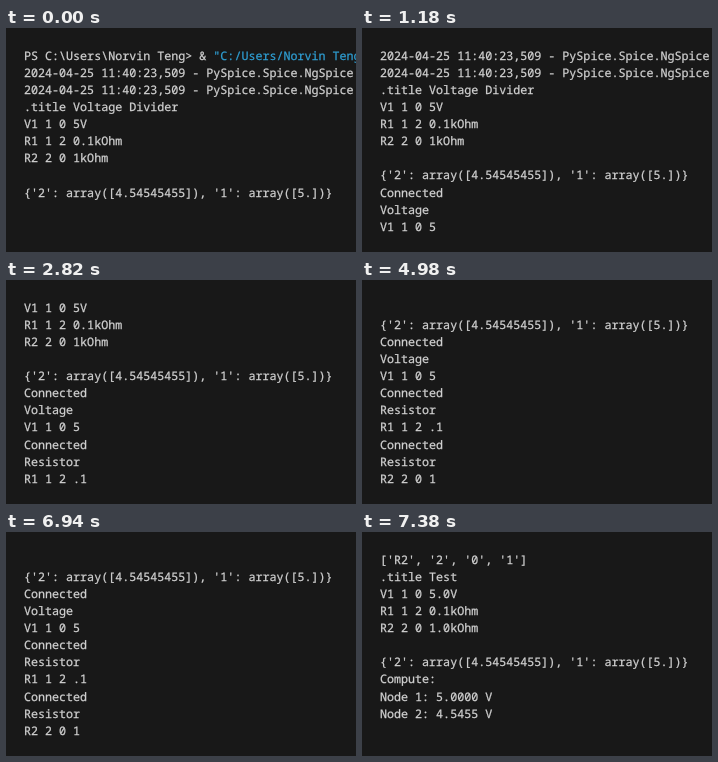
An HTML page for the animation above (8000 ms loop, 350 by 224 pixels).

```html
<!DOCTYPE html>
<html lang="en">
<head>
<meta charset="utf-8">
<title>Circuit terminal</title>
<style>
  html, body {
    margin: 0;
    width: 100%;
    height: 100%;
    overflow: hidden;
    background: #181818;
  }
  #stage {
    position: relative;
    width: 350px;
    height: 224px;
    overflow: hidden;
    background: #181818;
  }
  #term {
    position: absolute;
    left: 18px;
    top: 19.8px;
    margin: 0;
    color: #d2d2d2;
    font: 11.7px/17.1px "Noto Sans Mono", "DejaVu Sans Mono", monospace;
    font-variant-ligatures: none;
    text-rendering: geometricPrecision;
    -webkit-text-stroke: 0.25px;
    white-space: pre;
  }
  .path { color: #2f9fd4; }
</style>
</head>
<body>
<div id="stage"><pre id="term"></pre></div>
<script>
const LOOP = 8000;
const ROWS = 11;
const log = '2024-04-25 11:40:23,509 - PySpice.Spice.NgSpice.';
const result = "{'2': array([4.54545455]), '1': array([5.])}";

const lines = [
  'PS C:\\Users\\Norvin Teng> &amp; <span class="path">"C:/Users/Norvin Teng/</span>',
  log,
  log,
  '.title Voltage Divider',
  'V1 1 0 5V',
  'R1 1 2 0.1kOhm',
  'R2 2 0 1kOhm',
  '',
  result,
  'Connected', 'Voltage', 'V1 1 0 5',
  'Connected', 'Resistor', 'R1 1 2 .1',
  'Connected', 'Resistor', 'R2 2 0 1',
  "['R2', '2', '0', '1']",
  '.title Test',
  'V1 1 0 5.0V',
  'R1 1 2 0.1kOhm',
  'R2 2 0 1.0kOhm',
  '',
  result,
  'Compute:',
  'Node 1: 5.0000 V',
  'Node 2: 4.5455 V',
  ''
];

// [time in ms, number of lines printed so far]
const steps = [
  [0, 9],
  [500, 10], [540, 11], [580, 12],
  [2740, 13], [2780, 14], [2820, 15],
  [4980, 18],
  [7140, 29]
];

const term = document.getElementById('term');
const start = performance.now();
let shown = 0;

function draw(now) {
  const t = Math.max(0, now - start) % LOOP;
  const count = steps.filter(([at]) => at <= t).pop()[1];
  if (count !== shown) {
    shown = count;
    term.innerHTML = lines.slice(Math.max(0, count - ROWS), count).join('\n');
  }
  requestAnimationFrame(draw);
}
draw(start);
</script>
</body>
</html>
```
